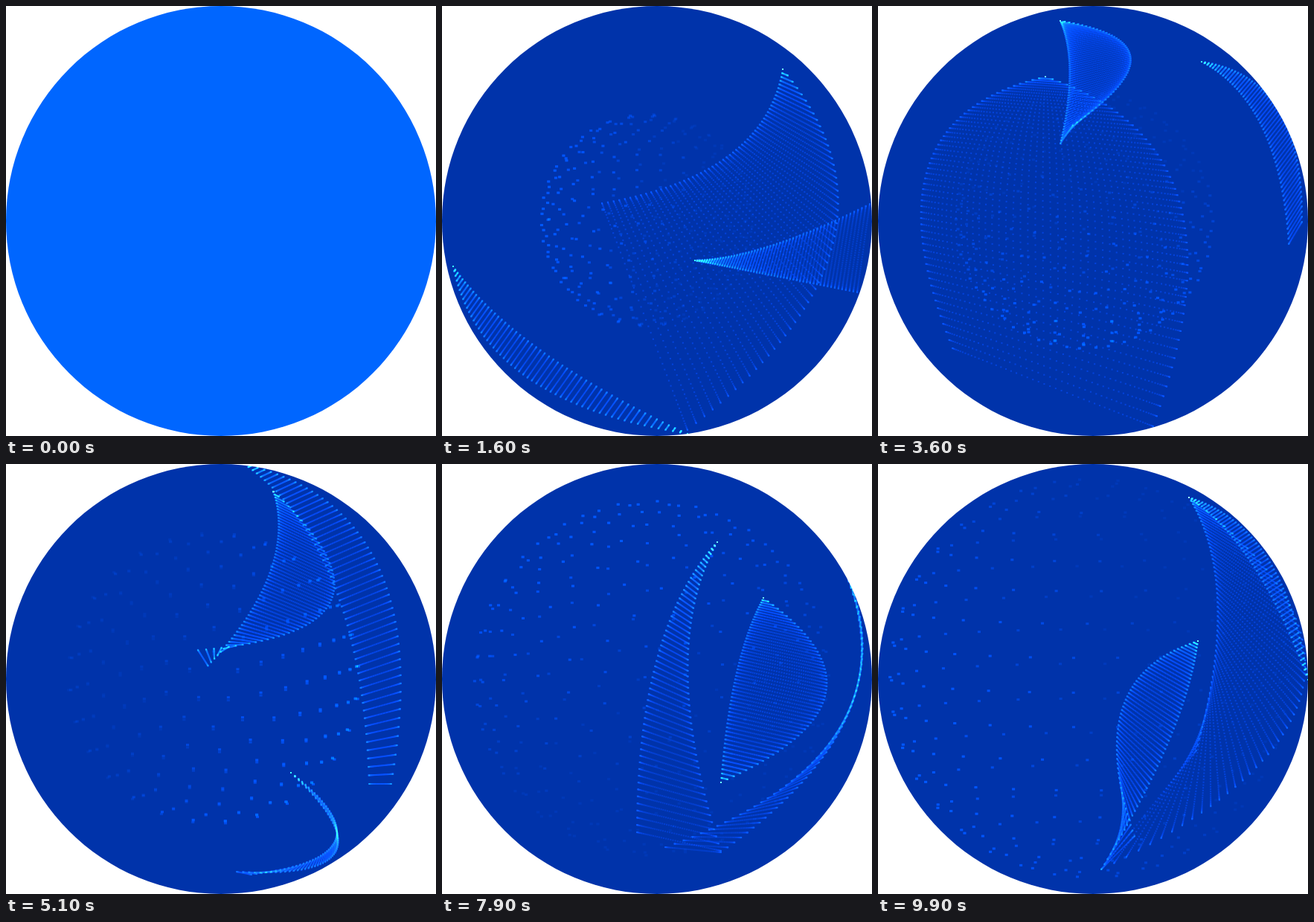
These frames come from a looping animation (578x578 px, 10000 ms). An HTML page with a canvas:

```html
<!DOCTYPE html>
<html lang="en">
<head>
<meta charset="utf-8">
<title>Particle waves</title>
<style>
  html, body { margin: 0; width: 100%; height: 100%; overflow: hidden; background: #fff; }
  canvas { display: block; width: 578px; height: 578px; border-radius: 50%; }
</style>
</head>
<body>
<canvas id="c" width="578" height="578"></canvas>
<script>
const SIZE = 578, LOOP = 10000, GRID = 56;
const HELD = [13, 21, 26, 31, 42, 47, 52, 57, 62, 84, 94]; // steps that repeat the one before
const ctx = document.getElementById('c').getContext('2d');

// A veil hangs between two bent edges that leave one tip.
const veil = (time, tip, near, bendNear, far, bendFar) =>
  ({ time, values: [...tip, ...near, bendNear, ...far, bendFar] });

const sail = [
  veil(1.6, [458, 85], [215, 265], -.33, [330, 570], -.5),
  veil(3.6, [225, 95], [100, 460], .57, [370, 565], -.5),
  veil(5.1, [320, 0], [488, 430], -.23, [518, 430], -.45),
  veil(6.5, [372, 152], [48, 445], .12, [48, 445], -.57),
  veil(7.9, [432, 180], [375, 428], .1, [375, 428], -.87),
  veil(9.9, [418, 45], [428, 385], -.2, [300, 545], -.81),
];
const wing = [
  veil(1.6, [340, 342], [575, 266], .1, [558, 385], 0),
  veil(3.6, [435, 75], [570, 290], -.42, [552, 320], -.26),
  veil(5.1, [383, 415], [310, 548], -1.37, [330, 552], -1.2),
  veil(6.5, [440, 125], [10, 330], .79, [60, 450], 0),
  veil(7.9, [370, 105], [262, 495], .18, [375, 520], .2),
  veil(9.9, [430, 238], [345, 500], .5, [300, 545], -.1),
];
const ribbon = [
  veil(1.6, [15, 350], [330, 575], .33, [330, 575], .12),
  veil(3.6, [245, 20], [245, 185], -.15, [262, 160], -1.25),
  veil(7.9, [540, 140], [375, 522], -.4, [300, 515], -.5),
  veil(9.9, [418, 45], [578, 290], -.3, [578, 290], -.15),
];

const mix = (a, b, f) => a + (b - a) * f;

function spline(a, b, c, d, f) {
  return b + f * (c - a + f * (2 * a - 5 * b + 4 * c - d + f * (3 * (b - c) + d - a))) / 2;
}

function valuesAt(keys, time) {
  const last = keys.length - 1;
  let i = 0;
  while (i < last - 1 && time >= keys[i + 1].time) i++;
  let f = (time - keys[i].time) / (keys[i + 1].time - keys[i].time);
  if (f < 0) f *= .35; // gentle lead-in before the first key
  const [a, b, c, d] = [i - 1, i, i + 1, i + 2]
    .map(k => keys[Math.max(0, Math.min(last, k))].values);
  return b.map((v, k) => spline(a[k], v, c[k], d[k], f));
}

// Quadratic curve whose control point stands off the chord, nearer the tip.
function edge(x, y, endX, endY, bend) {
  const midX = mix(x, endX, .35) - bend * (endY - y);
  const midY = mix(y, endY, .35) + bend * (endX - x);
  const curve = (a, b, c, u) => mix(mix(a, b, u), mix(b, c, u), u);
  return u => [curve(x, midX, endX, u), curve(y, midY, endY, u)];
}

function drawVeil(keys, time) {
  const [x, y, nx, ny, nb, fx, fy, fb] = valuesAt(keys, time);
  const near = edge(x, y, nx, ny, nb), far = edge(x, y, fx, fy, fb);
  const [ax, ay] = near(.5), [bx, by] = far(.5);
  const glow = Math.min(.2, .06 + Math.hypot(bx - ax, by - ay) * .002);
  ctx.fillStyle = `rgba(10, 75, 255, ${glow})`;
  for (let i = 0; i < GRID; i++) {
    const u = i / (GRID - 1), [x0, y0] = near(u), [x1, y1] = far(u);
    for (let j = 0; j < GRID; j++) {
      const v = (1 - Math.cos(Math.PI * j / (GRID - 1))) / 2; // dots gather at both edges
      ctx.fillRect(mix(x0, x1, v) - 1, mix(y0, y1, v) - 1, 2, 2);
    }
  }
}

function drawSphere(time) {
  const radius = 118 + 15.2 * time, cx = 274 + time, cy = 288;
  const tilt = time * .31, cos = Math.cos(tilt), sin = Math.sin(tilt);
  const light = 4.42 - .8 * time, lightX = Math.cos(light), lightY = Math.sin(light);
  for (let i = 1; i < 18; i++) {
    const lat = Math.PI * i / 18, ring = Math.sin(lat), count = Math.round(28 * ring);
    for (let j = 0; j < count; j++) {
      const lon = 2 * Math.PI * j / count + time * .06;
      const x = ring * Math.cos(lon), y0 = Math.cos(lat), z0 = ring * Math.sin(lon);
      const y = y0 * cos - z0 * sin, z = y0 * sin + z0 * cos;
      const glow = Math.max(.05, .15 + .25 * (x * lightX + y * lightY) + .06 * z);
      ctx.fillStyle = `rgba(0, 95, 255, ${glow})`;
      ctx.fillRect(cx + x * radius - 2, cy + y * radius - 1.5, 4, 3);
    }
  }
}

function draw(step) {
  ctx.globalCompositeOperation = 'source-over';
  ctx.fillStyle = step ? '#0033aa' : '#0066ff';
  ctx.fillRect(0, 0, SIZE, SIZE);
  if (!step) return;
  ctx.globalCompositeOperation = 'lighter';
  drawSphere(step / 10);
  for (const keys of [sail, wing, ribbon]) drawVeil(keys, step / 10);
}

const start = performance.now();
let shown = -1;
function tick() {
  let step = Math.floor((performance.now() - start) % LOOP / 100);
  if (HELD.includes(step)) step--;
  if (step !== shown) draw(shown = step);
  requestAnimationFrame(tick);
}
tick();
</script>
</body>
</html>
```
